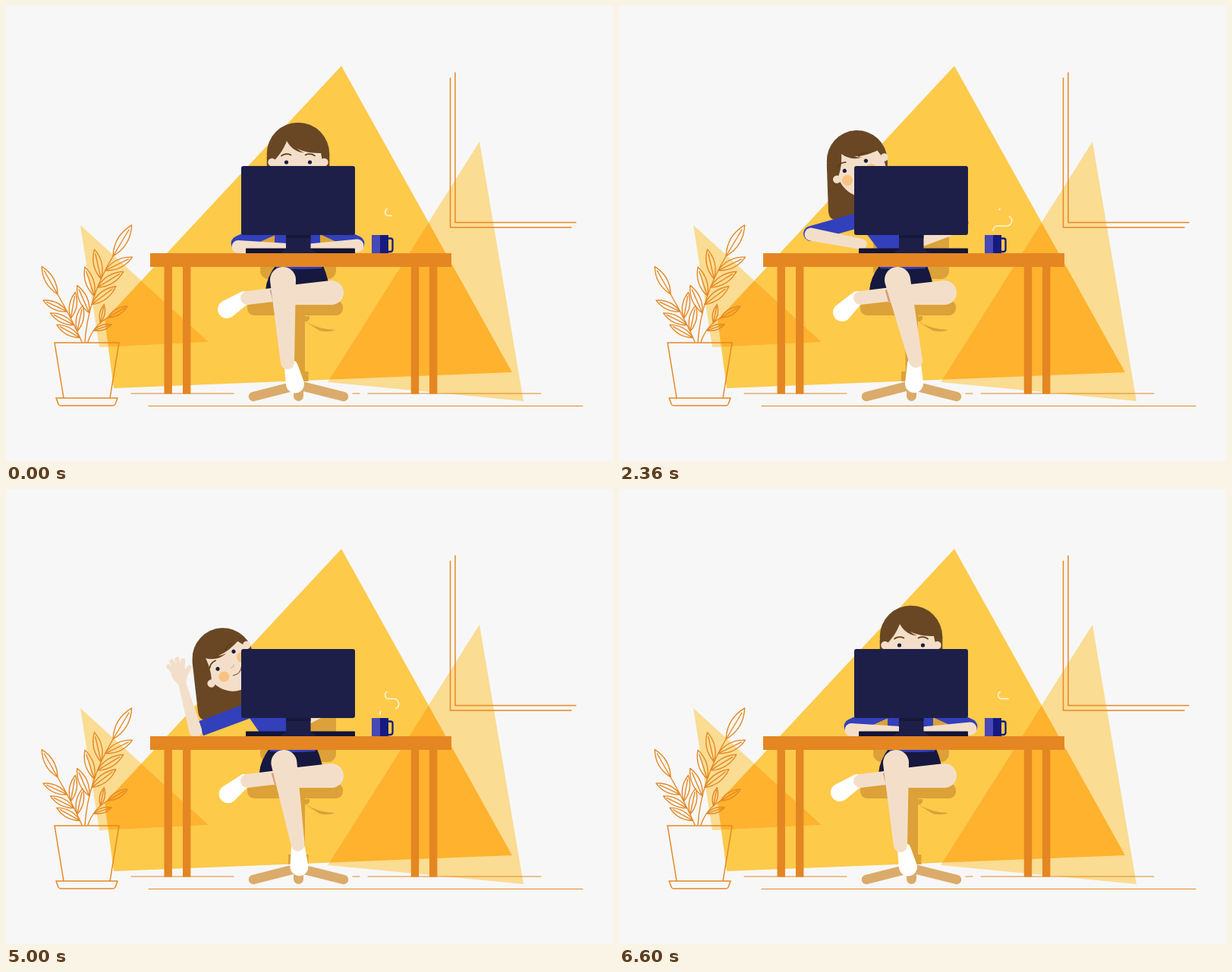
Recreate the animation shown at these times as an HTML page with a canvas. Size 800 by 600 pixels, loop 6.64 s.

```html
<!DOCTYPE html>
<html lang="en">
<head>
<meta charset="utf-8">
<title>At the desk</title>
<style>
html, body { margin: 0; width: 100%; height: 100%; overflow: hidden; background: #f7f7f7; }
canvas { display: block; width: 800px; height: 600px; }
</style>
</head>
<body>
<canvas id="stage" width="800" height="600"></canvas>
<script>
const c = document.getElementById('stage').getContext('2d');
const LOOP = 6640, TAU = 2 * Math.PI, RAD = Math.PI / 180;
const LINE = '#e58824', WOOD = '#e48622', CHAIR = '#dca138', BASE = '#dbab6b';
const SKIN = '#f3dfc9', HAIR = '#694724', BLUE = '#3240bc', DARK = '#16183f', SCREEN = '#1d1f48';

// ---- timing
const mix = (a, b, p) => Array.isArray(a) ? a.map((v, i) => mix(v, b[i], p)) : a + (b - a) * p;

function ease(t, from, to) {
  const p = Math.min(1, Math.max(0, (t - from) / (to - from)));
  return p * p * (3 - 2 * p);
}
// rises from 0 to 1, holds, falls back
const span = (t, in0, in1, out0, out1) => ease(t, in0, in1) - ease(t, out0, out1);

// upright -> peeking out -> leaning far out -> upright
function pose(t, sit, peek, lean) {
  const out = mix(mix(sit, peek, ease(t, 1960, 2350)), lean, ease(t, 2350, 2720));
  return mix(out, sit, ease(t, 4910, 5760));
}

// ---- drawing helpers
function poly(pts, fill) {
  c.beginPath();
  pts.forEach(p => c.lineTo(p[0], p[1]));
  c.closePath();
  c.fillStyle = fill;
  c.fill();
}
function rect(x0, y0, x1, y1, fill, r = 0) {
  c.beginPath();
  c.roundRect(x0, y0, x1 - x0, y1 - y0, r);
  c.fillStyle = fill;
  c.fill();
}
function disc(x, y, r, fill) {
  c.beginPath();
  c.arc(x, y, r, 0, TAU);
  c.fillStyle = fill;
  c.fill();
}
function shape(d, fill) {
  c.fillStyle = fill;
  c.fill(new Path2D(d));
}
function stroke(d, color, width, cap = 'round') {
  c.strokeStyle = color;
  c.lineWidth = width;
  c.lineCap = cap;
  c.lineJoin = 'round';
  c.stroke(new Path2D(d));
}
function bar(a, b, width, color, cap) {
  stroke(`M${a} L${b}`, color, width, cap);
}
// tapered capsule between two circles
function limb([x0, y0], r0, [x1, y1], r1, fill) {
  const a = Math.atan2(y1 - y0, x1 - x0);
  const o = Math.acos((r0 - r1) / Math.hypot(x1 - x0, y1 - y0));
  c.beginPath();
  c.arc(x0, y0, r0, a + o, a - o + TAU);
  c.arc(x1, y1, r1, a - o, a + o);
  c.closePath();
  c.fillStyle = fill;
  c.fill();
}

// ---- room
function backdrop() {
  const big = [[442, 79], [667, 483], [142, 504], [130, 414]];
  const small = [
    [[624, 179], [682, 521], [424, 496]],
    [[98, 289], [267, 443], [123, 450]]
  ];
  c.fillStyle = '#f7f7f7';
  c.fillRect(0, 0, 800, 600);
  poly(big, '#fdca4a');
  small.forEach(s => poly(s, '#fadc92'));
  c.save();
  c.beginPath();
  big.forEach(p => c.lineTo(p[0], p[1]));
  c.clip();
  small.forEach(s => poly(s, '#feb22d'));
  c.restore();

  stroke('M592 88V285.5H751M585.5 95V292H745', LINE, 1.5);
  stroke('M165 511H300M457 511H466M477 511H705M188 527.5H760', LINE, 1.2);
}

function leaf([x, y], angle, len) {
  const w = len * .27;
  c.save();
  c.translate(x, y);
  c.rotate(angle);
  stroke(`M0 0Q${len / 2} ${w} ${len} 0Q${len / 2} ${-w} 0 0H${len * .85}`, LINE, 1.4);
  c.restore();
}

// curved stem with alternating leaves and one at the tip
function branch(root, bend, tip, { first, step, count, side, len }) {
  stroke(`M${root}Q${bend} ${tip}`, LINE, 1.4);
  for (let i = 0; i <= count; i++) {
    const u = i < count ? first + i * step : 1;
    const p = mix(root, bend, u), q = mix(bend, tip, u);
    const dir = Math.atan2(q[1] - p[1], q[0] - p[0]);
    const turn = i < count ? 37 * RAD * side : 0;
    leaf(mix(p, q, u), dir + turn, i < count ? len : len * 1.2);
    side = -side;
  }
}

function plant() {
  stroke('M64 444H149L137 517H76ZM66 517H147L144 525Q143 527 141 527H72Q70 527 69 525Z', LINE, 1.5);
  branch([104, 443], [108, 385], [141, 330], { first: .33, step: .1, count: 6, side: -1, len: 40 });
  branch([100, 443], [88, 415], [68, 380], { first: .1, step: .14, count: 5, side: -1, len: 35 });
  branch([108, 443], [115, 422], [134, 411], { first: .4, step: .32, count: 2, side: 1, len: 25 });
}

function chair() {
  rect(335, 230, 435, 360, CHAIR, 11);
  for (const x of [326, 445]) bar([385, 500], [x, 515], 12.5, BASE);
  bar([385.5, 498], [385.5, 514.5], 13, BASE);
  rect(377.5, 400, 394, 495, CHAIR);
  rect(372, 482, 398.5, 495, CHAIR);
  shape('M393 409H400V413L397 416H393Z', CHAIR);
  shape('M393 415Q412 427 434 427Q424 431 413 428Z', CHAIR);
  rect(318, 388, 444, 408, CHAIR, 9);
}

function desk() {
  rect(316, 319.5, 460, 327, '#131537', 1);
  rect(369, 300, 401.5, 322, SCREEN);
  shape('M369 320H401.5L410 326H361Z', SCREEN);
  rect(369, 302, 401.5, 306, '#161839');
  rect(310, 211, 460, 302, SCREEN, 3);

  rect(482, 302, 493, 326, '#4848b6');
  rect(493, 302, 504, 326, '#161a80');
  stroke('M503 306.5H507Q509.5 306.5 509.5 309V321Q509.5 324 506.5 324H503', '#161a80', 2.3, 'butt');

  for (const x of [208.5, 233, 533.8, 558]) rect(x, 340, x + 10.4, 511.5, WOOD);
  rect(190, 326, 587, 344, WOOD);
}

// ---- steam: dashes sent along one curl at a steady beat
const CURL = 'M493 298C492 294 495 290 500 290H511A6.75 6.75 0 0 0 511 276.5H504C498.5 276.5 498 267 504.5 267';
const CURL_LEN = 64, PUFF = 40, PUFFS = 11, BEAT = 489, FIRST_PUFF = 1043;

function steam(t) {
  for (let i = 0; i < PUFFS; i++) {
    const age = (t - FIRST_PUFF - i * BEAT + LOOP) % LOOP;
    const lead = age * .122;
    const a = Math.max(0, lead - PUFF), b = Math.min(CURL_LEN, lead);
    if (b - a < .2) continue;
    c.setLineDash([0, a, b - a, 999]);
    stroke(CURL, '#fff6e2', 1.5, 'butt');
  }
  c.setLineDash([]);
}

// ---- person
function legs(t) {
  const twist = span(t, 1960, 2320, 4850, 5250);
  const tap = .5 - .5 * Math.cos(7 * TAU * t / LOOP);

  c.save();
  c.translate(-12 * twist, 0);
  shape('M357 340Q343 358 342 375L360 384L412 378L425 364Q422 352 417 340Z', DARK);
  shape('M356 340H418L416 346Q388 348 356 346Z', BLUE);
  c.restore();

  limb([314, 385], 9, [291 + 3 * tap, 400 + 4 * tap], 12, '#fff');
  disc(318, 385, 9, SKIN);
  disc(429, 378, 16, SKIN);
  shape('M317 376L350 372L384 367L428 362L429 394H382L352 390L318 394Z', SKIN);
  bar([350.5 + 3 * twist, 374], [355 + 3 * twist, 390], 6, '#dc9d80', 'butt');

  limb(mix([376, 476], [389, 472], twist), 9, mix([381, 498.5], [389, 498], twist), 12, '#fff');
  limb([365 + 2 * twist, 361], 17, mix([371, 470], [391, 468], twist), 9, SKIN);
}

function torso(t) {
  const [tl, tr, bl, br] = pose(t, [354, 414, 354, 414], [311, 385, 359, 400], [304, 370, 350, 400]);
  poly([[tl, 280], [tr, 280], [br, 344], [bl, 344]], BLUE);
}

function rightArm(t) {
  const shoulder = pose(t, [415, 291], [390, 278], [370, 275]);
  const elbow = pose(t, [463, 316], [451, 289], [435, 281]);
  const hand = pose(t, [403, 320], [395, 312], [393, 305]);
  bar(shoulder, [elbow[0], elbow[1] - 3], 19, BLUE);
  limb(elbow, 8.5, hand, 6.8, SKIN);
}

function leftArm(t) {
  const up = span(t, 3160, 3580, 5080, 5480);
  const wave = -Math.cos((t - 4080) / 520 * TAU);
  const shoulder = pose(t, [355, 291], [322, 280.5], [325, 290]);
  const cuff = pose(t, [306.5, 313], [253, 300], [255, 316]);
  const elbow = pose(t, [306, 317.5], [253, 301], [248, 319]);
  const [rest, len] = pose(t, [2, 61], [11, 68], [11, 66]);
  const a = mix(rest, -105 + 6 * wave, up) * RAD;
  const wrist = [elbow[0] + len * Math.cos(a), elbow[1] + len * Math.sin(a)];

  bar(shoulder, cuff, 20, BLUE, up > .5 ? 'butt' : 'round');
  limb(elbow, 8.5, wrist, mix(7, 5, up), SKIN);
  if (up > 0) hand(wrist, a + Math.PI / 2, up);
}

function hand(wrist, angle, size) {
  c.save();
  c.translate(...wrist);
  c.rotate(angle);
  c.scale(size, size);
  shape('M-5 1C-11 -8 -12 -14 -9 -19Q0 -24 9 -18C11 -12 9 -6 5 1Z', SKIN);
  for (let i = 0; i < 4; i++) {
    const f = (-24 + 14 * i) * RAD, reach = 32 - 1.5 * (i - 1.7) ** 2;
    bar([3 * i - 5, -13], [reach * Math.sin(f), -reach * Math.cos(f)], 6, SKIN);
  }
  bar([4, -6], [15, -17], 6, SKIN);
  c.restore();
}

function head(t) {
  const alert = span(t, 640, 1640, 6000, 6500);
  const [x, y, deg, r] = pose(t, [385, 206 - 3 * alert, 0, 41.3], [318.5, 214, -25, 40], [291, 232, -49, 40.3]);
  const [fx, fy] = pose(t, [0, -3 * alert], [-5, -6], [1, -7]);
  const a = deg * RAD;
  const cx = x + 11 * Math.sin(a), cy = y - 11 * Math.cos(a);

  // long hair hanging from the crown
  const [hx, hy] = pose(t, [345, 285], [277, 283], [251, 306]);
  c.beginPath();
  c.moveTo(cx - r, cy + 4);
  c.lineTo(hx - 1, hy - 12);
  c.quadraticCurveTo(hx, hy, hx + 10, hy - 1);
  c.lineTo(hx + 66, hy - 14);
  c.lineTo(cx + r, cy + 22);
  c.lineTo(cx + r, cy);
  c.fillStyle = HAIR;
  c.fill();

  c.save();
  c.translate(x, y);
  c.rotate(a);
  disc(0, -11, r, HAIR);
  disc(-34.5, 0, 5.2, SKIN);
  disc(34.5, 0, 5.2, SKIN);
  shape('M-32 -2C-24 -9 -18 -20 -15 -28C-10 -19 -2 -13 8 -12.5C4 -14 1 -16 -1 -18' +
    'C8 -13 20 -12 30 -12L32 -2C34 22 18 38 0 38C-18 38 -34 22 -32 -2Z', SKIN);

  c.translate(fx, fy);
  for (const s of [-1, 1]) {
    disc(s * 17.5, 13, 7, '#f9c283');
    disc(s * 15.5, 0, 2.6, '#1c1c40');
    stroke(`M${s * 22} -8.5Q${s * 16} -12.5 ${s * 9.5} -9.5`, '#5c3d1b', 1.7);
  }
  stroke('M-3 12Q0 14 3 12', '#dfb48e', 1.3);
  const smile = span(t, 2750, 3000, 4700, 4940);
  if (smile > .05) {
    const low = mix(27, 33, smile);
    shape(`M-9 21Q0 ${mix(27, 24, smile)} 10 21Q9 ${low} 0 ${low}Q-9 ${low} -9 21Z`, '#fff');
  } else {
    stroke('M-8 21Q0 27 8 21', '#8a5a35', 1.2);
  }
  c.restore();
}

function frame(now) {
  const t = now % LOOP;
  backdrop();
  plant();
  chair();
  torso(t);
  head(t);
  rightArm(t);
  leftArm(t);
  legs(t);
  desk();
  steam(t);
}

let began;
function tick(now) {
  if (began === undefined) began = now;
  frame(now - began);
  requestAnimationFrame(tick);
}
frame(0);
requestAnimationFrame(tick);
</script>
</body>
</html>
```
